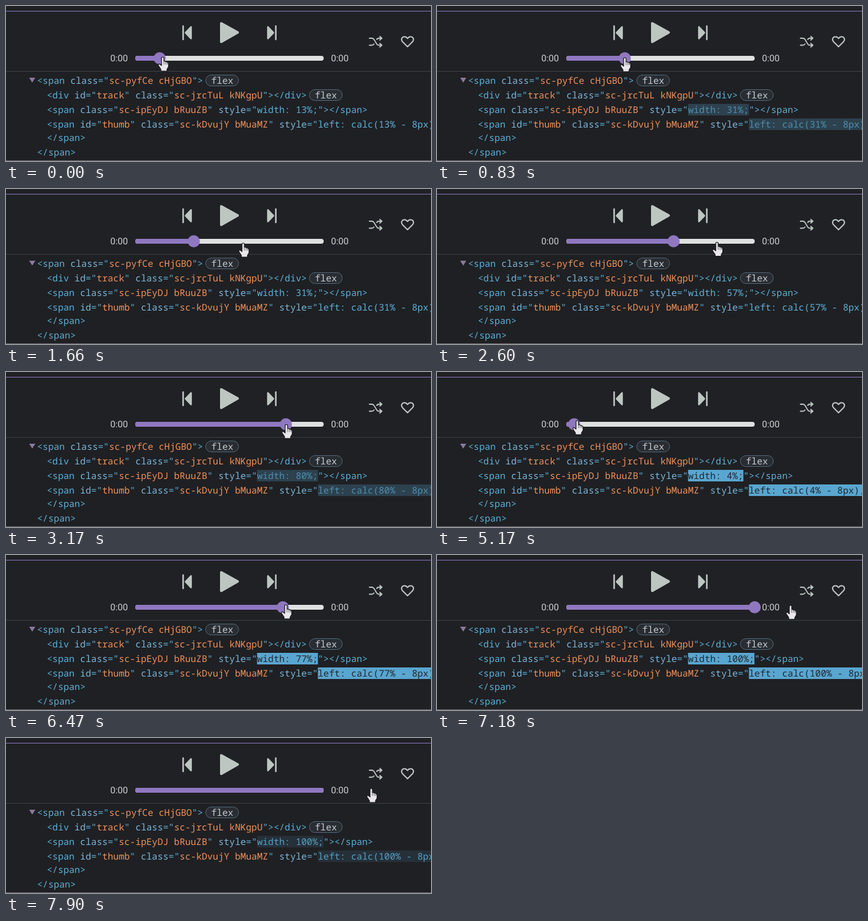
Write an HTML page with a canvas that moves like this. It is 697x255 px and loops after 8 s.

```html
<!DOCTYPE html>
<html lang="en">
<head>
<meta charset="utf-8">
<title>Slider inspector</title>
<style>
  html, body { margin: 0; width: 100%; height: 100%; overflow: hidden; background: #202125; }
  canvas { display: block; }
</style>
</head>
<body>
<canvas id="stage" width="697" height="255"></canvas>
<script>
const ctx = document.getElementById('stage').getContext('2d');
const LOOP = 8000, STEPS = 68, CHAR = 9.072;
const TRACK = { x: 212, y: 82, w: 309, h: 8 };
const ICON = '#bdc6c1', PURPLE = '#9078c0', TAG = '#5db0d7', ATTR = '#7cb7dc', VALUE = '#f0915c';

// Pointer tip: [step, x, y]
const POINTER = [
  [0, 257, 84], [3, 308, 85], [8, 308, 85], [13, 389, 89], [16, 389, 89],
  [21, 459, 88], [28, 460, 86], [34, 300, 81], [35, 280, 81], [38, 223, 80],
  [42, 223, 80], [44, 230, 80], [49, 308, 80], [55, 459, 82], [56, 484, 82],
  [62, 599, 83]
];
// Clicks before the drag: [step until which the thumb rests, x]
const RESTS = [[3.8, 252], [14.8, 308], [23.8, 388], [28, 459]];

const HAND = new Path2D('M-2 2Q-2 0 0 0Q2 0 2 2V7Q4 6 5 8Q7 7 7.5 9Q9.5 8.5 9.5 11V16L7 20V23H-3V20L-7 14Q-7.5 11 -5 11.5L-2 14Z');
const FINGERS = new Path2D('M2 7V12M5 8V12M7.5 9V12');
const PLAY = new Path2D('M353 28.5L380 43.5L353 59Z');
const SKIP = new Path2D('M1.5 0V22M14.5 1.5V20.5L5.5 11Z');
const SHUFFLE = new Path2D('M596 53H600Q602 53 603.5 55L608 62.5Q609 64.5 611.5 64.5H616M596 64.5H600Q602 64.5 603.5 62.5M608 55Q609 53 611.5 53H616M613 50L616.5 53L613 56M613 61.5L616.5 64.5L613 67.5');
const HEART = new Path2D('M658.5 67L650.5 59C646.5 54.5 650 50.5 653.5 50.5Q656.5 50.5 658.5 53.5Q660.5 50.5 663.5 50.5C667 50.5 670.5 54.5 666.5 59Z');

const mix = (a, b, p) => a + (b - a) * p;

function pointerAt(step) {
  const i = POINTER.findIndex(key => key[0] > step);
  if (i < 0) return POINTER.at(-1).slice(1);
  const a = POINTER[Math.max(i - 1, 0)], b = POINTER[i];
  const p = Math.max(0, (step - a[0]) / (b[0] - a[0]));
  return [mix(a[1], b[1], p), mix(a[2], b[2], p)];
}

function sliderAt(step) {
  const rest = RESTS.find(([end]) => step < end);
  return rest ? rest[1] : pointerAt(step)[0] - 5;
}

// Strength of the flash after the latest style update
function flashAt(step) {
  let age = 0;
  while (age < 7 && sliderAt(step - age - .15) === sliderAt(step - age - 1.15)) age++;
  return (1 - age / 7) ** 2.5;
}

function rect(x, y, w, h, color) {
  ctx.fillStyle = color;
  ctx.fillRect(x, y, w, h);
}

function pill(x, y, w, h, r, color) {
  ctx.beginPath();
  ctx.roundRect(x, y, w, h, r);
  ctx.fillStyle = color;
  ctx.fill();
}

function outline(path, width, color = ICON) {
  ctx.lineWidth = width;
  ctx.strokeStyle = color;
  ctx.stroke(path);
}

function text(str, x, y, color) {
  ctx.fillStyle = color;
  ctx.fillText(str, x, y);
}

function codeLine(line, x, y, flash = 0) {
  let name = '';
  line.split(/(\w+(?==")|(?<==")[^"]*)/).forEach((part, i, parts) => {
    let color = TAG;
    const width = part.length * CHAR;
    if (i % 2 && parts[i + 1].startsWith('=')) {
      name = part;
      color = ATTR;
    } else if (i % 2 && name === 'style') {
      rect(x, y - 15, width, 19, `rgba(89, 166, 208, ${flash})`);
      color = `rgb(${mix(93, 32, flash)}, ${mix(176, 40, flash)}, ${mix(215, 48, flash)})`;
    } else if (i % 2) {
      color = VALUE;
    }
    text(part, x, y, color);
    x += width;
  });
}

function badge(x, y) {
  pill(x + .5, y + .5, 54, 18, 9, '#292d32');
  ctx.lineWidth = 1;
  ctx.strokeStyle = '#50687a';
  ctx.stroke();
  text('flex', x + 9.5, y + 14.5, '#c3cbd2');
}

function drawSkip(x, mirror) {
  ctx.save();
  ctx.translate(x, 33);
  ctx.scale(mirror, 1);
  ctx.fillStyle = ICON;
  ctx.fill(SKIP);
  outline(SKIP, 2.6);
  ctx.restore();
}

function drawPlayer(step) {
  rect(0, 8, 697, 1, '#8c73c0');
  drawSkip(289, 1);
  drawSkip(444, -1);
  ctx.fillStyle = ICON;
  ctx.fill(PLAY);
  outline(PLAY, 4);
  outline(SHUFFLE, 1.8);
  outline(HEART, 2);

  ctx.font = '15px Roboto, sans-serif';
  text('0:00', 171, 91, '#cdd2cf');
  text('0:00', 533, 91, '#cdd2cf');

  const thumb = Math.min(sliderAt(step), TRACK.x + TRACK.w);
  pill(TRACK.x, TRACK.y, TRACK.w, TRACK.h, 4, '#dee1df');
  pill(TRACK.x, TRACK.y, thumb - TRACK.x, TRACK.h, 4, PURPLE);
  if (step < 64) pill(thumb - 10, 76, 20, 20, 10, PURPLE);
}

function drawCode(step) {
  const shown = Math.min(1, (sliderAt(step - .15) - TRACK.x) / TRACK.w);
  const percent = Math.round(shown * 100), flash = flashAt(step);
  rect(0, 107, 697, 148, '#1f2023');
  rect(0, 107, 697, 1, '#3c3f44');
  rect(0, 254, 697, 1, '#716b78');
  ctx.fillStyle = '#8b799f';
  ctx.fill(new Path2D('M38 118H48L43 126Z'));

  ctx.font = '15.12px "Noto Sans Mono", monospace';
  codeLine('<span class="sc-pyfCe cHjGBO">', 51, 128);
  codeLine('<div id="track" class="sc-jrcTuL kNKgpU"></div>', 67, 152);
  codeLine(`<span class="sc-ipEyDJ bRuuZB" style="width: ${percent}%;"></span>`, 67, 176, flash);
  codeLine(`<span id="thumb" class="sc-kDvujY bMuaMZ" style="left: calc(${percent}% - 8px);">`, 67, 200, flash);
  codeLine('</span>', 67, 222);
  codeLine('</span>', 51, 246);
  badge(327, 113);
  badge(497, 137);
}

function drawPointer(step) {
  ctx.save();
  ctx.translate(...pointerAt(step));
  ctx.fillStyle = '#e9e7e9';
  ctx.fill(HAND);
  outline(HAND, 1.2, '#17171a');
  outline(FINGERS, .9, '#55555a');
  ctx.restore();
}

function frame(now) {
  const step = Math.min(STEPS - 1, Math.floor((now % LOOP) / LOOP * STEPS + .2));
  ctx.lineJoin = ctx.lineCap = 'round';
  ctx.textRendering = 'geometricPrecision';
  rect(0, 0, 697, 255, '#202125');
  drawPlayer(step);
  drawCode(step);
  drawPointer(step);
  requestAnimationFrame(frame);
}

const start = performance.now();
requestAnimationFrame(function begin() {
  const tick = () => frame(performance.now() - start);
  const raf = window.requestAnimationFrame.bind(window);
  window.requestAnimationFrame = () => raf(tick);
  tick();
});
</script>
</body>
</html>
```
